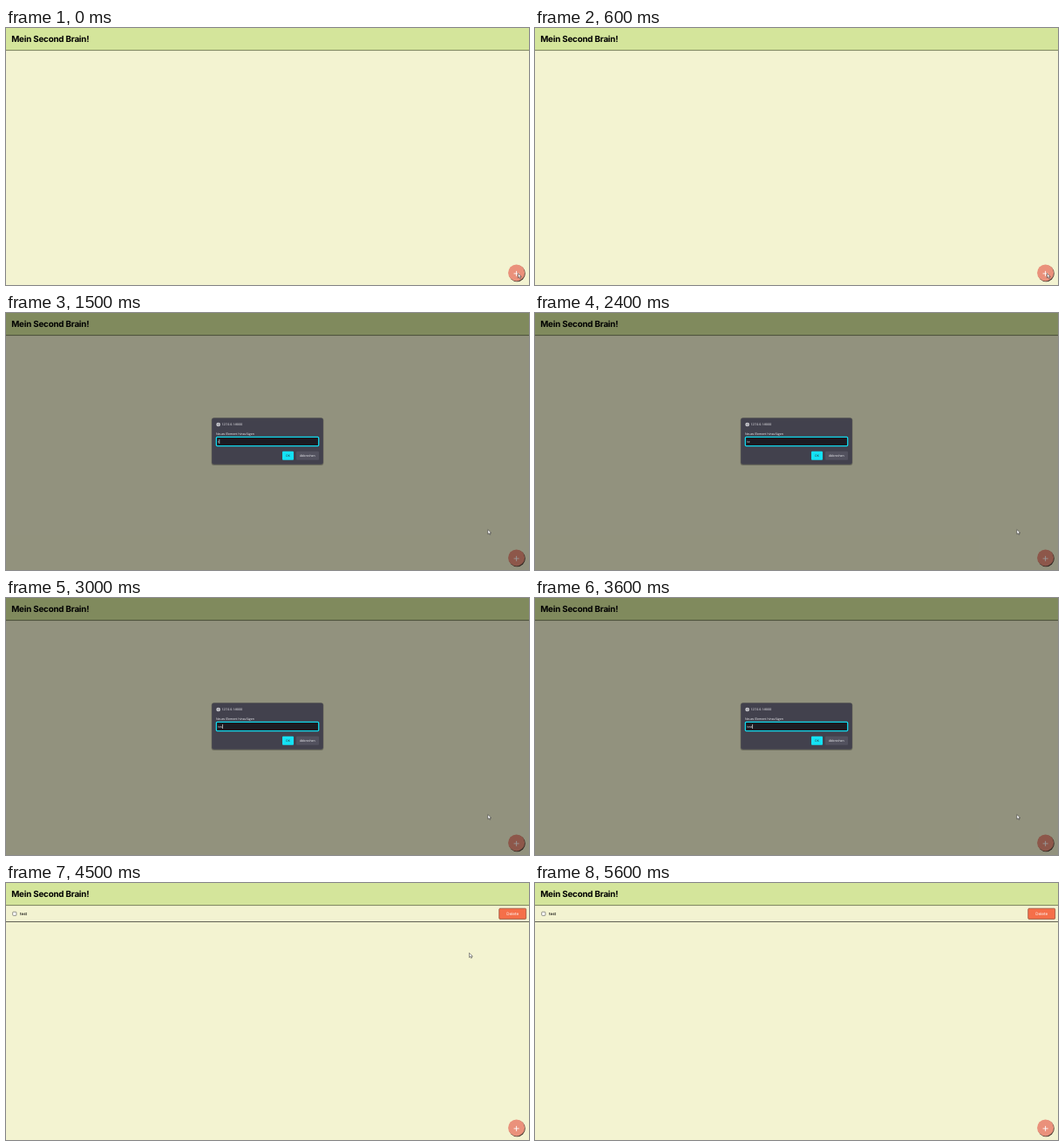
Write an HTML page that moves like this. It is 600x295 px and loops after 5700 ms.

```html
<!DOCTYPE html>
<html lang="de">
<head>
<meta charset="utf-8">
<title>Mein Second Brain!</title>
<style>
  html, body { margin: 0; width: 100%; height: 100%; overflow: hidden; background: #f3f3d1; }
  svg { display: block; width: 600px; height: 295px; }
  text { font-family: Inter, sans-serif; }
  #dialog text { font: 3.5px "Open Sans", "Noto Sans", sans-serif; fill: #fbfbfe; }
</style>
</head>
<body>
<svg viewBox="0 0 600 295" text-rendering="geometricPrecision">
  <rect width="600" height="295" fill="#f3f3d1"/>
  <rect width="600" height="25.5" fill="#d4e59b"/>
  <path d="M0 25.6H600" stroke="#5c6544" stroke-width=".8"/>
  <text x="6.2" y="16" font-size="9.8" font-weight="650" letter-spacing="-.2">Mein Second Brain!</text>

  <g id="row">
    <path d="M0 44.5H600" stroke="#3d3d35" stroke-width=".8"/>
    <rect x="7.7" y="33.2" width="4.2" height="4.2" rx=".7" fill="#fff" stroke="#686860" stroke-width=".7"/>
    <text x="16" y="37" font-size="4.5" font-weight="500">test</text>
    <rect x="565.7" y="29.2" width="31" height="12.2" rx="1.2" fill="#f56f49" stroke="#7c3c29" stroke-width=".6"/>
    <text x="581.2" y="37" font-size="4.6" fill="#fff" text-anchor="middle">Delete</text>
  </g>

  <g id="add">
    <circle cx="586.3" cy="281.7" r="9.5" fill="#55443a"/>
    <circle cx="585.6" cy="280.9" r="9.5" fill="#ea917b"/>
    <path d="M582.6 281.9h6M585.6 278.9v6" stroke="#fff" stroke-width=".9"/>
  </g>

  <rect id="shade" width="600" height="295" fill-opacity=".4"/>

  <g id="dialog">
    <rect x="235.6" y="120.3" width="128.8" height="54.6" rx="3" fill-opacity=".25"/>
    <rect x="236.2" y="120.6" width="127.6" height="53.2" rx="2.4" fill="#42414d"/>
    <circle cx="243.6" cy="128" r="2.3" fill="#d8d8dd"/>
    <path d="M241.6 128h4M243.6 126v4" stroke="#77767f" stroke-width=".5"/>
    <text x="247.4" y="129.3">127.0.0.1:8000</text>
    <text x="240.9" y="140.4">Neues Element hinzufügen</text>
    <rect x="241.3" y="142.4" width="117.4" height="10.2" rx="1" fill="#1c1b22" stroke="#10d8ec" stroke-width="1.3"/>
    <text id="entry" x="243.2" y="148.9"></text>
    <rect id="caret" y="145" width=".6" height="5" fill="#fbfbfe"/>
    <rect x="317" y="158.8" width="13" height="10" rx="1" fill="#14e2f5"/>
    <text x="323.5" y="165.1" text-anchor="middle" style="fill:#2b2a33">OK</text>
    <rect x="333" y="158.8" width="26" height="10" rx="1" fill="#52515e"/>
    <text x="345.8" y="165.1" text-anchor="middle">Abbrechen</text>
  </g>

  <path id="cursor" d="M0 0V5.2L1.3 4.1 2.1 6 3.1 5.6 2.3 3.8H3.9Z" fill="#fff" stroke="#222" stroke-width=".5"/>
</svg>
<script>
const LOOP = 5700, OPEN = 700, CLOSE = 3700, ADDED = 3900;
const KEYS = [1400, 1800, 2800, 3200];
const WORD = "test";
const HOME = [587.4, 281.6], REST = [552.8, 248.6], AWAY = [520, -10];

const $ = id => document.getElementById(id);
const [row, shade, dialog, entry, caret, cursor] =
  ["row", "shade", "dialog", "entry", "caret", "cursor"].map($);

const show = (el, on) => el.setAttribute("display", on ? "inline" : "none");
const ease = (t, from, to) => {
  const u = Math.min(1, Math.max(0, (t - from) / (to - from)));
  return u * u * (3 - 2 * u);
};
const mix = (a, b, u) => a.map((v, i) => v + (b[i] - v) * u);

function drawEntry(t) {
  const typed = KEYS.filter(k => t >= k);
  const text = WORD.slice(0, typed.length);
  if (entry.textContent !== text) entry.textContent = text;
  const lastKey = typed.length ? typed[typed.length - 1] : OPEN;
  // The blink restarts with every keystroke.
  show(caret, (t - lastKey) % 1000 < 500);
  caret.setAttribute("x", 243.3 + (text ? entry.getComputedTextLength() : 0));
}

function draw(t) {
  const open = t >= OPEN && t < CLOSE;
  show(shade, open);
  show(dialog, open);
  show(row, t >= ADDED);
  if (open) drawEntry(t);

  const [x, y] = t < CLOSE
    ? mix(HOME, REST, ease(t, 750, 1200))
    : mix(REST, AWAY, ease(t, 4200, 4700));
  cursor.setAttribute("transform", `translate(${x} ${y})`);
}

const start = performance.now();
function tick() {
  draw((performance.now() - start) % LOOP);
  requestAnimationFrame(tick);
}
tick();
</script>
</body>
</html>
```
